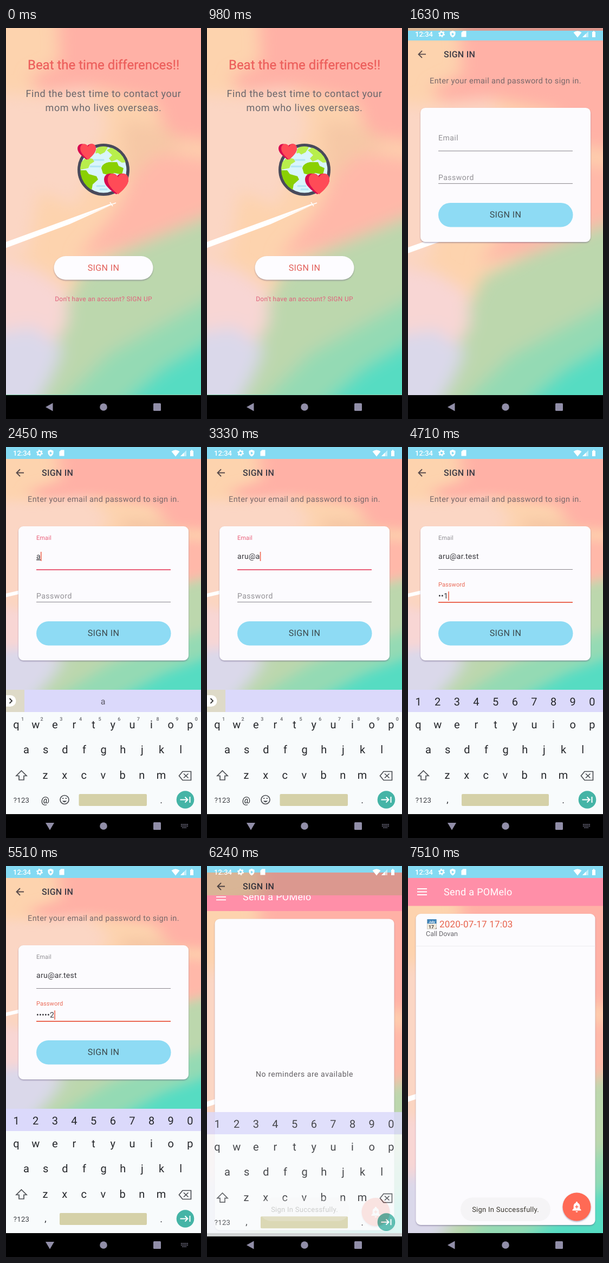
Animation of 360x720 px, one loop 7.53 s. Source, as an HTML page:

```html
<!DOCTYPE html>
<html lang="en">
<head>
<meta charset="utf-8">
<title>Reminder app walkthrough</title>
<style>
  html, body { margin: 0; width: 100%; height: 100%; overflow: hidden; background: #000; }
  #stage { position: relative; width: 360px; height: 720px; overflow: hidden; background: #000; }
  #stage svg, .screen { position: absolute; left: 0; top: 0; display: block; }
  .screen { width: 360px; height: 676px; overflow: hidden; }
  svg { font-family: Roboto, "Open Sans", sans-serif; text-rendering: geometricPrecision; }
  .mid { text-anchor: middle; }

  #welcome svg, #signin, #signin svg, #main, #main svg, .dim, #status, #keyboard, #toast, #empty, #item {
    animation: 7530ms linear infinite;
  }
  #welcome svg { animation-name: welcome-out; }
  #signin { animation-name: signin-reveal; }
  #signin svg { animation-name: signin-move; }
  #main { animation-name: main-reveal; }
  #main svg { animation-name: main-move; }
  #welcome .dim { animation-name: welcome-dim; }
  #signin .dim { animation-name: signin-dim; }
  #status { animation-name: status-show; }
  #keyboard { animation-name: keyboard; }
  #toast { animation-name: toast; }
  #empty { animation-name: empty; }
  #item { animation-name: item; }

  /* 1300-1725 ms: sign-in opens; 6060-6485 ms: reminder list opens */
  @keyframes welcome-out {
    0%, 17.26% { transform: none; animation-timing-function: cubic-bezier(.4,0,.2,1); }
    22.91%, 100% { transform: translateY(-15px); }
  }
  @keyframes welcome-dim { 0%, 17.26% { opacity: 0; } 20%, 100% { opacity: .14; } }
  @keyframes signin-reveal {
    0%, 17.26% { clip-path: inset(100% 0 0 0); animation-timing-function: cubic-bezier(.06,.68,.12,1); }
    22.91%, 100% { clip-path: inset(0 0 0 0); }
  }
  @keyframes signin-move {
    0%, 17.26% { transform: translateY(29px); animation-timing-function: cubic-bezier(.4,0,.2,1); }
    22.91%, 80.48% { transform: none; animation-timing-function: cubic-bezier(.4,0,.2,1); }
    86.12%, 100% { transform: translateY(-15px); }
  }
  @keyframes signin-dim { 0%, 80.48% { opacity: 0; } 82.8%, 100% { opacity: .14; } }
  @keyframes main-reveal {
    0%, 80.48% { clip-path: inset(100% 0 0 0); animation-timing-function: cubic-bezier(.06,.68,.12,1); }
    86.12%, 100% { clip-path: inset(0 0 0 0); }
  }
  @keyframes main-move {
    0%, 80.48% { transform: translateY(28px); animation-timing-function: cubic-bezier(.4,0,.2,1); }
    86.12%, 100% { transform: none; }
  }
  @keyframes status-show { 0%, 18.6% { opacity: 0; } 18.61%, 100% { opacity: 1; } }
  @keyframes keyboard {
    0%, 27.22% { transform: translateY(25px); opacity: 0; }
    29.22%, 82.34% { transform: none; opacity: 1; }
    82.87% { transform: translateY(6px); opacity: .85; }
    84.6%, 100% { transform: translateY(25px); opacity: 0; }
  }
  @keyframes toast { 0%, 82.6% { opacity: 0; } 83.8%, 100% { opacity: 1; } }
  @keyframes empty { 0%, 91.63% { opacity: 1; } 91.64%, 100% { opacity: 0; } }
  @keyframes item { 0%, 91.63% { opacity: 0; } 91.64%, 100% { opacity: 1; } }
</style>
</head>
<body>
<svg width="0" height="0" style="position:absolute">
  <defs>
    <filter id="soft" x="-20%" y="-20%" width="140%" height="140%"><feGaussianBlur stdDeviation="15"/></filter>
    <filter id="lift" x="-20%" y="-20%" width="140%" height="150%">
      <feDropShadow dx="0" dy="1.5" stdDeviation="1.2" flood-color="#5d5074" flood-opacity=".5"/>
    </filter>
    <symbol id="sky" viewBox="0 0 360 676" preserveAspectRatio="none">
      <rect width="360" height="676" fill="#fdd3ae"/>
      <g filter="url(#soft)">
        <path fill="#fbd6c4" d="M-40 120L60 125 150 110 190 170 130 330 60 300 40 420-40 420Z"/>
        <path fill="#ffb1a6" d="M95-40H410V215L300 200 275 135 160 110 65 118 42 92 100 65Z"/>
        <path fill="#ffb8a9" d="M130 425L205 335 260 225 410 245V350L250 400Z"/>
        <path fill="#f6c8a6" d="M215 170L290 180 330 215 270 240 220 290Z"/>
        <path fill="#bcd7ad" d="M-40 670L95 545 140 450 220 408 410 330V720H-40Z"/>
        <path fill="#94dab4" d="M70 720L190 600 290 545 410 480V720Z"/>
        <path fill="#57dcc2" d="M180 720L290 625 410 555V720Z"/>
        <path fill="#f8d6d4" d="M-40 420L50 440 110 480 115 540 80 600-40 640Z"/>
        <path fill="#dad8ea" d="M-40 565L50 550 105 590 85 640 40 720H-40Z"/>
      </g>
      <path fill="#fff" d="M0 394L118 351 192 324 194 326 122 355 193 327 118 361 0 405Z"/>
      <path stroke="#fff" stroke-width="1.6" d="M186 328L203 322M192 321L197 328"/>
    </symbol>
    <path id="heart" d="M0 .85C-.5 .5-1 .1-1-.35C-1-.7-.75-.85-.5-.85C-.25-.85-.08-.7 0-.55C.08-.7.25-.85.5-.85C.75-.85 1-.7 1-.35C1 .1 .5 .5 0 .85Z"/>
    <g id="love">
      <use href="#heart" fill="#d80b50"/>
      <use href="#heart" fill="#ff4b57" transform="translate(.15) scale(.85 1)"/>
    </g>
    <clipPath id="disc"><circle cx="180" cy="261" r="43"/></clipPath>
  </defs>
</svg>

<div id="stage">
  <div class="screen" id="welcome">
    <svg width="360" height="691">
      <use href="#sky" width="360" height="676"/>
      <rect y="675" width="360" height="16" fill="#8fdcb8"/>
      <g class="mid">
        <text x="180" y="76" font-size="24" fill="#ec5f5c" stroke="#ec5f5c" stroke-width=".3">Beat the time differences!!</text>
        <g font-size="18" letter-spacing=".55" fill="#6a676c">
          <text x="180" y="127">Find the best time to contact your</text>
          <text x="180" y="153">mom who lives overseas.</text>
        </g>
      </g>
      <circle cx="180" cy="261" r="45.2" fill="#d9f5fc" stroke="#494a5b" stroke-width="5.6"/>
      <g clip-path="url(#disc)">
        <path stroke="#b2e5f5" stroke-width="3" stroke-linecap="round" d="M160 243H180M156 255H174M168 291H182M174 297H186"/>
        <path fill="#b8ee4c" d="M165 231L167 222 180 214 188 220 182 229 174 233 170 230ZM186 225L196 219Q216 224 224 247L214 248 205 242 195 246 190 240 196 234ZM136 250L148 238 160 241 163 246 155 251 152 258 137 261Z"/>
        <path fill="#8ad003" d="M134 262H148L153 269 167 273 170 279 160 288 157 304 140 296ZM176 258Q178 249 190 247H205L208 254 217 258 214 270 200 267 190 271 179 268Z"/>
      </g>
      <use href="#love" transform="translate(149 228) scale(17)"/>
      <use href="#love" transform="translate(203.5 287) scale(22.5)"/>
      <rect x="88.5" y="420" width="183" height="43.5" rx="21.7" fill="#fdfcff" filter="url(#lift)"/>
      <g class="mid">
        <text x="180" y="447" font-size="16" letter-spacing=".4" fill="#e2605a">SIGN IN</text>
        <text x="180" y="503" font-size="12" letter-spacing=".28" fill="#e0627c">Don't have an account? SIGN UP</text>
      </g>
      <rect class="dim" width="360" height="691"/>
    </svg>
  </div>

  <div class="screen" id="signin">
    <svg width="360" height="720">
      <rect y="22" width="360" height="698" fill="#8fdcb8"/>
      <use id="backdrop" href="#sky" y="22" width="360" height="654"/>
      <path d="M33 47.5H20M26 41L19.5 47.5 26 54" fill="none" stroke="#5a4c4c" stroke-width="1.9"/>
      <text x="66" y="53" font-size="16" font-weight="500" letter-spacing=".25" fill="#3b3a45">SIGN IN</text>
      <text class="mid" x="180" y="101" font-size="14.5" letter-spacing=".37" fill="#77686a">Enter your email and password to sign in.</text>
      <rect x="23" y="146" width="314" height="247" rx="9" fill="#fcfbfe" filter="url(#lift)"/>
      <g id="fields"></g>
      <rect x="56" y="321" width="248.5" height="44.5" rx="22.2" fill="#8edbf4"/>
      <text class="mid" x="180" y="348" font-size="16" letter-spacing=".4" fill="#3d4a4e">SIGN IN</text>
      <rect class="dim" y="22" width="360" height="698"/>
      <rect width="360" height="22" fill="#84daf2"/>
    </svg>
  </div>

  <div class="screen" id="main">
    <svg width="360" height="720">
      <use href="#sky" y="73" width="360" height="603"/>
      <rect width="360" height="22" fill="#84daf2"/>
      <rect y="22" width="360" height="51.5" fill="#ff8fa8"/>
      <path d="M17 42H35M17 47.5H35M17 53H35" stroke="#fff" stroke-width="1.8"/>
      <text x="66" y="54" font-size="18" letter-spacing=".3" fill="#fff">Send a POMelo</text>
      <rect x="14.5" y="88" width="331" height="573" rx="9" fill="#fcfbfe" filter="url(#lift)"/>
      <text id="empty" class="mid" x="180" y="379" font-size="14" letter-spacing=".55" fill="#625f63">No reminders are available</text>
      <g id="item">
        <rect x="35.5" y="99" width="17" height="17" fill="#efe9dc" stroke="#b9b4ad" stroke-width=".6"/>
        <rect x="35.5" y="98" width="17" height="8" fill="#3f83b8"/>
        <path d="M50 116L53 113V116Z" fill="#9a8f86"/>
        <g class="mid" font-weight="700">
          <text x="44" y="104.5" font-size="6" fill="#fff">July</text>
          <text x="43" y="114.5" font-size="8.5" fill="#473f3d">17</text>
        </g>
        <text x="58" y="113" font-size="17" letter-spacing=".2" fill="#e8624c">2020-07-17 17:03</text>
        <text x="33" y="129" font-size="12.5" fill="#67656a">Call Dovan</text>
        <path d="M14.5 147.5H345.5" stroke="#eeecef"/>
      </g>
      <circle cx="311.5" cy="627.5" r="26" fill="#ff6b54" filter="url(#lift)"/>
      <g fill="#fff">
        <circle cx="311.5" cy="619.8" r="1.7"/>
        <path d="M303.5 634.5V633L305.7 630.8V626A5.8 6 0 0 1 317.3 626V630.8L319.5 633V634.5ZM309.5 635.7H313.5A2 2 0 0 1 309.5 635.7Z"/>
      </g>
      <path d="M308.5 627.5H314.5M311.5 624.5V630.5" stroke="#ff6b54" stroke-width="1.5"/>
    </svg>
  </div>

  <svg id="status" width="360" height="22" fill="#fff">
    <text x="13" y="16" font-size="13" font-weight="500">12:34</text>
    <circle cx="62" cy="11" r="3.4" fill="none" stroke="#fff" stroke-width="2.4"/>
    <circle cx="62" cy="11" r="5.2" fill="none" stroke="#fff" stroke-width="1.6" stroke-dasharray="2.7"/>
    <path d="M82.5 5L87.5 7V11Q87 15 82.5 17.5 78 15 77.5 11V7Z"/>
    <path d="M80.8 8.5L85.5 11.2 80.8 14Z" fill="#84daf2"/>
    <path d="M101.5 5.5H107.5V16.5H98.5V8.5Z"/>
    <path d="M305.5 8.2Q313 2.8 320.5 8.2L313 17.5Z"/>
    <path d="M322 17H333V6Z" opacity=".5"/>
    <path d="M322 17H328.5V10.5Z"/>
    <path d="M340 7H341.8V5.5H344.2V7H346V17H340Z"/>
  </svg>

  <svg id="nav" width="360" height="720" fill="#918ea8">
    <rect y="676" width="360" height="44" fill="#000"/>
    <path id="back" d="M73 698L86.5 690.5V705.5Z"/>
    <g id="hide">
      <path d="M73 692H89L81 705.5Z"/>
      <path d="M323 695H336M323 698H336M325.5 701H333.5" stroke="#918ea8" stroke-width="1.6" stroke-dasharray="1.7 1.1"/>
    </g>
    <circle cx="180" cy="698" r="6.8"/>
    <rect x="272" y="691" width="14" height="14" rx="1.5"/>
  </svg>

  <svg id="keyboard" width="360" height="720">
    <rect y="447" width="360" height="41" fill="#dbd9fb"/>
    <rect y="488" width="360" height="188" fill="#f8fbfc"/>
    <g id="keys" class="mid" font-size="20" fill="#25272b"></g>
    <g id="emailKeys" class="mid" fill="#25272b">
      <rect y="447" width="34" height="41" fill="#dedac8"/>
      <path d="M0 457H8A10.5 10.5 0 0 1 8 478H0Z" fill="#fff"/>
      <path d="M6.5 463L11 467.5 6.5 472" fill="none" stroke="#333" stroke-width="1.8"/>
      <text id="suggest" x="179" y="474" font-size="16" fill="#5a5866"></text>
      <text x="72.5" y="656" font-size="17">@</text>
      <g fill="none" stroke="#4c4f54" stroke-width="1.7">
        <circle cx="108" cy="649.5" r="8"/>
        <path d="M103.8 651.5Q108 657 112.2 651.5Z" fill="#4c4f54" stroke="none"/>
        <path d="M104.2 647H106.2M109.8 647H111.8" stroke-width="2.2"/>
      </g>
    </g>
    <g id="passKeys" class="mid" fill="#25272b">
      <text x="73" y="655" font-size="17">,</text>
    </g>
    <rect id="space" x="134.5" y="639" width="125.5" height="22" rx="2" fill="#d5d1a8"/>
    <g class="mid" fill="#3a3c41">
      <text x="28.5" y="655" font-size="13" letter-spacing=".3">?123</text>
      <text x="286.5" y="656" font-size="18">.</text>
    </g>
    <g fill="none" stroke="#4c4f54" stroke-width="1.7">
      <path d="M28.5 596L38 605.5H33V613H24V605.5H19Z"/>
      <path d="M326 597.5H341.5V613.5H326L319.5 605.5ZM328 601.5L336.5 609.5M336.5 601.5L328 609.5"/>
    </g>
    <circle cx="331" cy="649.5" r="16.3" fill="#45b4a6"/>
    <path d="M321.5 649.5H335M330.5 644.5L335.5 649.5 330.5 654.5M339.5 644V655" fill="none" stroke="#fff" stroke-width="2"/>
  </svg>

  <svg id="toast" width="360" height="720">
    <rect x="97" y="610.5" width="166" height="43.5" rx="21.7" fill="#f5f4f6"/>
    <text class="mid" x="180" y="637" font-size="13" letter-spacing=".26" fill="#3a372f">Sign In Successfully.</text>
  </svg>
</div>

<script>
  const LOOP = 7530;
  const NS = 'http://www.w3.org/2000/svg';
  const $ = id => document.getElementById(id);
  const show = (el, on) => { el.style.visibility = on ? 'visible' : 'hidden'; };

  function set(el, attrs) {
    for (const k in attrs) el.setAttribute(k, attrs[k]);
  }
  function add(parent, tag, attrs, text = '') {
    const el = document.createElementNS(NS, tag);
    set(el, attrs);
    el.textContent = text;
    return parent.appendChild(el);
  }

  function addRow(parent, chars, x, y) {
    [...chars].forEach((c, i) => add(parent, 'text', { x: x + 35.65 * i, y }, c));
  }
  addRow($('keys'), 'qwertyuiop', 19, 518);
  addRow($('keys'), 'asdfghjkl', 37.5, 564);
  addRow($('keys'), 'zxcvbnm', 72.5, 611);
  const hints = add($('emailKeys'), 'g', { 'font-size': 9, 'font-weight': 500, fill: '#65676c' });
  addRow(hints, '1234567890', 30.5, 503.5);
  const digits = add($('passKeys'), 'g', { 'font-size': 20 });
  addRow(digits, '1234567890', 19, 476);

  function makeField(name, labelY, textY, lineY, accent) {
    const g = $('fields');
    return {
      labelY, textY, lineY, accent,
      label: add(g, 'text', { x: 56 }, name),
      value: add(g, 'text', { x: 56, y: textY, 'font-size': 14, 'letter-spacing': .3, fill: '#37363b' }),
      line: add(g, 'rect', { x: 56, width: 248 }),
      caret: add(g, 'rect', { y: textY - 13, width: 1.6, height: 17, fill: '#ee6750' })
    };
  }
  const email = makeField('Email', 171, 206, 225, '#ea607a');
  const pass = makeField('Password', 257, 279, 285, '#ea6955');

  function drawField(f, text, focused, composing, caretOn) {
    const small = focused || text;
    set(f.label, {
      y: small ? f.labelY : f.textY,
      'font-size': small ? 11 : 14,
      'letter-spacing': small ? .1 : .5,
      fill: focused ? f.accent : '#929095'
    });
    if (f.value.textContent !== text) f.value.textContent = text;
    f.value.style.textDecoration = composing ? 'underline' : 'none';
    set(f.line, { y: f.lineY, height: focused ? 2 : 1, fill: focused ? f.accent : '#89868c' });
    f.caret.setAttribute('x', 56 + (text ? f.value.getComputedTextLength() : 0));
    show(f.caret, focused && caretOn);
  }

  const address = 'aru@ar.test';
  const addressTimes = [2400, 2620, 2830, 3060, 3270, 3430, 3560, 3690, 3810, 3930, 4060];
  const secret = '121212';
  const secretTimes = [4420, 4560, 4690, 4850, 5000, 5150];
  const emailFocus = 2000, passFocus = 4280;
  const countBy = (times, t) => times.filter(x => x <= t).length;

  function render(t) {
    const typed = address.slice(0, countBy(addressTimes, t));
    const n = countBy(secretTimes, t);
    const revealLast = n && t - secretTimes[n - 1] < 1000;
    const masked = '•'.repeat(revealLast ? n - 1 : n) + (revealLast ? secret[n - 1] : '');
    const onEmail = t >= emailFocus && t < passFocus;
    const onPass = t >= passFocus;
    const composing = onEmail && typed && !typed.includes('@');
    const lastKey = Math.max(emailFocus, ...[...addressTimes, passFocus, ...secretTimes].filter(x => x <= t));
    const caretOn = (t - lastKey) % 1000 < 500;

    drawField(email, typed, onEmail, composing, caretOn);
    drawField(pass, masked, onPass, false, caretOn);
    $('suggest').textContent = composing ? typed : '';

    show($('emailKeys'), !onPass);
    show($('passKeys'), onPass);
    const left = onPass ? 99 : 134.5;
    set($('space'), { x: left, width: 260 - left });

    const open = t >= 2050 && t < 6200;
    show($('hide'), open);
    show($('back'), !open);
    $('backdrop').setAttribute('height', t >= 2150 ? 425 : 654);
  }

  let start = null;
  function tick(now) {
    if (start === null) start = now;
    render((now - start) % LOOP);
    requestAnimationFrame(tick);
  }
  render(0);
  requestAnimationFrame(tick);
</script>
</body>
</html>
```
